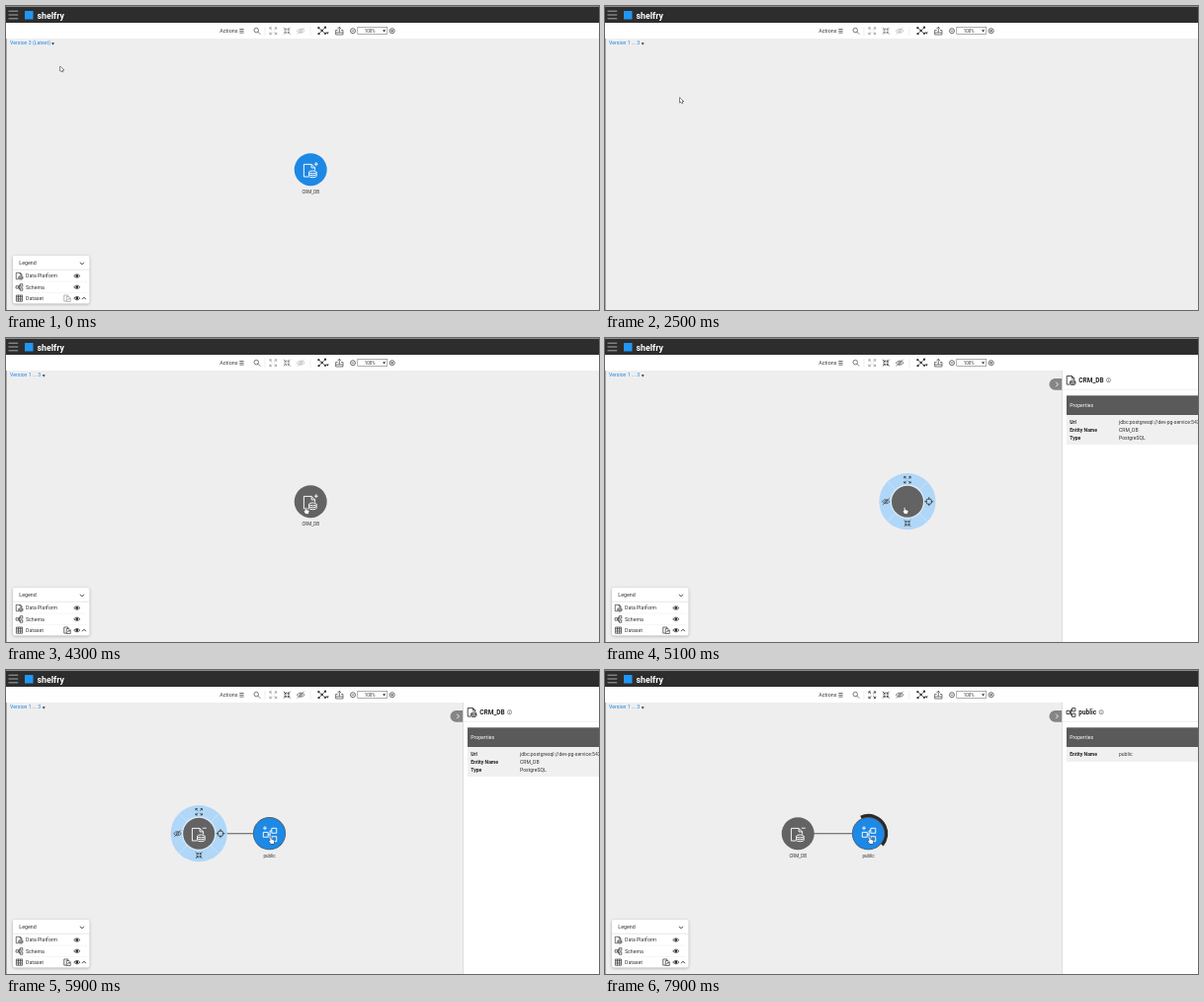
These frames come from a looping animation (600 by 308 pixels, 8000 ms). An HTML page with a canvas:

```html
<!DOCTYPE html>
<html lang="en">
<head>
<meta charset="utf-8">
<title>Data map</title>
<style>
html, body { margin: 0; width: 100%; height: 100%; overflow: hidden; background: #efeeef; }
canvas { display: block; width: 600px; height: 308px; }
</style>
</head>
<body>
<canvas id="stage"></canvas>
<script>
const W = 600, H = 308, LOOP = 8000;
const BLUE = '#1e88e5', INK = '#333', GREY = '#636363', PALE = '#b5b5b5';
const canvas = document.getElementById('stage');
const ctx = canvas.getContext('2d');
const ratio = window.devicePixelRatio || 1;
canvas.width = W * ratio;
canvas.height = H * ratio;

// Icons are drawn around 0,0 in a box of about ten units.
const ICONS = {
  doc: 'M-1 4.5H-4.5V-4.5H1L3.5-2V-.2M1-4.5V-2H3.5M-.8 1.2a2.7 1 0 1 0 5.4 0a2.7 1 0 1 0-5.4 0V4a2.7 1 0 0 0 5.4 0V1.2M-.8 2.6a2.7 1 0 0 0 5.4 0',
  schema: 'M-4.7-1.6H-1.3V1.8H-4.7ZM1.2-4.4H4.6V-1H1.2ZM1.2 1.4H4.6V4.8H1.2ZM-1.3 0H0V-2.7H1.2M0 0V3.1H1.2',
  table: 'M-4.3-4.3H4.3V4.3H-4.3ZM-4.3-1.9H4.3M-4.3 1.2H4.3M-1.4-4.3V4.3M1.6-4.3V4.3',
  compare: 'M-1 4H-4.5V-4.5H1V-2.5M-1-2.5H2.5L4.5-.5V4.5H-1ZM.2 2.8L3 0M1.3 0H3V1.7',
  eye: 'M-4.6 0Q0-5 4.6 0Q0 5-4.6 0Z',
  slash: 'M-4.6 0Q0-5 4.6 0Q0 5-4.6 0ZM-1.5 0a1.5 1.5 0 1 0 3 0a1.5 1.5 0 1 0-3 0M-4 4L4-4',
  expand: 'M-1.5-1.5L-4.5-4.5M-4.5-2V-4.5H-2M1.5-1.5L4.5-4.5M2-4.5H4.5V-2M-1.5 1.5L-4.5 4.5M-4.5 2V4.5H-2M1.5 1.5L4.5 4.5M2 4.5H4.5V2',
  collapse: 'M-4.5-4.5L-1.3-1.3M-3.8-1.3H-1.3V-3.8M4.5-4.5L1.3-1.3M3.8-1.3H1.3V-3.8M-4.5 4.5L-1.3 1.3M-3.8 1.3H-1.3V3.8M4.5 4.5L1.3 1.3M3.8 1.3H1.3V3.8',
  target: 'M-3.2 0a3.2 3.2 0 1 0 6.4 0a3.2 3.2 0 1 0-6.4 0M0-5V-2M0 2V5M-5 0H-2M2 0H5',
  search: 'M-4-1a3 3 0 1 0 6 0a3 3 0 1 0-6 0M1.2 1.2L4.4 4.4',
  net: 'M0 0L-3.5-3M0 0L3.5-3.4M0 0L-3.3 3.3M0 0L3.5 3',
  export: 'M-2-1H-4.5V4.5H4.5V-1H2M-4.5 2H4.5M0 2V-5M-2.2-2.8L0-5L2.2-2.8',
  minus: 'M-3.8 0a3.8 3.8 0 1 0 7.6 0a3.8 3.8 0 1 0-7.6 0M-2 0H2',
  plus: 'M-3.8 0a3.8 3.8 0 1 0 7.6 0a3.8 3.8 0 1 0-7.6 0M-2 0H2M0-2V2',
  info: 'M-3.8 0a3.8 3.8 0 1 0 7.6 0a3.8 3.8 0 1 0-7.6 0M0-.5V2.2M0-2.2V-1.4',
  down: 'M-3-1.5L0 1.5L3-1.5',
  up: 'M-3 1.5L0-1.5L3 1.5',
  right: 'M-1.5-3L1.5 0L-1.5 3'
};
for (const k in ICONS) ICONS[k] = new Path2D(ICONS[k]);
const ARROW = new Path2D('M0 0V5.2L1.2 4.1L2 5.9L2.8 5.5L2 3.8H3.7Z');
const HAND = new Path2D('M-.5 0Q.1-.6.7 0V2.3L3.3 2.9Q3.8 3.1 3.7 3.7L3.1 6.4H.2L-1.7 4Q-1.7 3-.5 3.6Z');

const clamp = v => Math.max(0, Math.min(1, v));
const mix = (a, b, p) => a + (b - a) * p;
const ease = p => p < .5 ? 4 * p ** 3 : 1 - (2 - 2 * p) ** 3 / 2;
const span = (t, a, b) => ease(clamp((t - a) / (b - a)));

function rect(x, y, w, h, color) {
  ctx.fillStyle = color;
  ctx.fillRect(x, y, w, h);
}

function disc(x, y, r, color) {
  ctx.fillStyle = color;
  ctx.beginPath();
  ctx.arc(x, y, r, 0, Math.PI * 2);
  ctx.fill();
}

function line(x1, y1, x2, y2, color, width) {
  ctx.strokeStyle = color;
  ctx.lineWidth = width;
  ctx.beginPath();
  ctx.moveTo(x1, y1);
  ctx.lineTo(x2, y2);
  ctx.stroke();
}

function text(s, x, y, size = 5.2, color = INK, weight = 400, align = 'left') {
  ctx.font = `${weight} ${size}px Roboto, Arial, sans-serif`;
  ctx.fillStyle = color;
  ctx.textAlign = align;
  ctx.textBaseline = 'alphabetic';
  ctx.fillText(s, x, y);
}

function icon(name, x, y, scale = .7, color = INK, width = .7) {
  ctx.save();
  ctx.translate(x, y);
  ctx.scale(scale, scale);
  ctx.strokeStyle = color;
  ctx.lineWidth = width / scale;
  ctx.stroke(ICONS[name]);
  ctx.restore();
}

function caret(x, y, color = INK) {
  ctx.fillStyle = color;
  ctx.beginPath();
  ctx.moveTo(x - 1.5, y - .9);
  ctx.lineTo(x + 1.5, y - .9);
  ctx.lineTo(x, y + 1.3);
  ctx.fill();
}

function eye(x, y) {
  icon('eye', x, y, .68, '#222', .7);
  disc(x, y, 1.3, '#222');
}

function card(x, y, w, h) {
  ctx.save();
  ctx.shadowColor = 'rgba(0,0,0,.3)';
  ctx.shadowBlur = 3 * ratio;
  ctx.shadowOffsetY = .7 * ratio;
  ctx.fillStyle = '#fff';
  ctx.beginPath();
  ctx.roundRect(x, y, w, h, 2);
  ctx.fill();
  ctx.restore();
}

function header() {
  rect(0, 0, W, 17, '#2d2d2d');
  rect(0, 0, W, .8, '#a0a0a0');
  for (const y of [5.2, 9, 12.8]) line(2.5, y, 12.2, y, '#c8c8c8', .8);
  rect(19, 5, 8.5, 8.5, '#2196f3');
  text('shelfry', 31.5, 12.8, 8.8, '#fff', 700);
}

function toolbar(t) {
  const focus = t >= 4600 ? INK : '#777';
  rect(0, 17, W, 16, '#fff');
  text('Actions', 216.3, 27, 5.35);
  for (const y of [23.5, 25.3, 27.1]) line(236.3, y, 240.6, y, INK, .7);
  icon('search', 254, 25.3, .75, '#444');
  line(262, 21, 262, 30, '#e3e3e3', .6);
  icon('expand', 270.3, 25.2, .75, t >= 6500 ? INK : '#999', .8);
  icon('collapse', 284.2, 25.2, .75, focus, .8);
  icon('slash', 298.2, 25.2, .85, t >= 4600 ? '#555' : PALE, .7);
  line(308, 21, 308, 30, '#e3e3e3', .6);
  icon('net', 319.7, 25, .95, INK, .7);
  for (const [x, y] of [[-3.5, -3], [3.5, -3.4], [-3.3, 3.3], [3.5, 3], [0, 0]])
    disc(319.7 + x * .95, 25 + y * .95, 1.15, INK);
  caret(325.3, 27.5);
  icon('export', 337.3, 25.3, .82, '#444');
  icon('minus', 351, 25.2, .66);
  ctx.strokeStyle = '#777';
  ctx.lineWidth = .6;
  ctx.strokeRect(355.8, 21.3, 30, 7.2);
  text('100%', 368.2, 26.8, 4.5, INK, 400, 'center');
  caret(382.6, 25.1);
  icon('plus', 390.7, 25.2, .66);
}

function versions(t) {
  const both = t >= 2400;
  text(both ? 'Version 1 ... 3' : 'Version 3 (Latest)', 4, 39.4, 5.2, BLUE);
  caret(both ? 38.2 : 47.5, 38.2);
  if (t < 1000 || both) return;
  card(4, 45, 78, 54);
  ctx.strokeStyle = '#aaa';
  ctx.lineWidth = .6;
  ctx.beginPath();
  ctx.roundRect(7.2, 48.2, 62, 7.6, 1.5);
  ctx.stroke();
  text('Search', 9.3, 53.5, 4.2, '#777');
  [3, 2, 1].forEach((n, i) => {
    const y = 66.4 + i * 13.3;
    text('Version ' + n, 9.3, y + 1.9, 5.2, BLUE);
    text('10/16/2023', 36, y + 1.9, 5.2, '#444');
    line(68.3, y - 3.5, 68.3, y + 3.5, '#ddd', .6);
    icon('compare', 75.2, y, .72, n === 3 || n === 1 && t >= 2100 ? INK : BLUE, .8);
    if (i < 2) line(6, y + 6.7, 80, y + 6.7, '#dfe8f0', .6);
  });
}

function legend(t) {
  card(7, 253, 77.5, 48.5);
  text('Legend', 13.3, 262, 5.3);
  icon('down', 77, 260.8, .65, '#222', .9);
  line(7, 267.2, 84.5, 267.2, '#ddd', .7);
  ['Data Platform', 'Schema', 'Dataset'].forEach((s, i) => {
    const y = 273.5 + i * 11.3;
    icon(['doc', 'schema', 'table'][i], 13.5, y, .72, INK, .7);
    text(s, 20, y + 1.9, 5.2);
    eye(71.8, y);
    if (i < 2) line(9, y + 5.6, 82, y + 5.6, '#ececec', .6);
  });
  icon('compare', 62, 296.2, .72, t >= 2400 ? INK : '#999', .7);
  icon('up', 79, 296.2, .65, '#222', .9);
}

function sign(x, y, minus) {
  line(x - 2, y, x + 2, y, '#fff', .9);
  if (!minus) line(x, y - 2, x, y + 2, '#fff', .9);
}

function ring(x, y) {
  disc(x, y, 28.6, '#b0d7f8');
  for (let a = Math.PI / 4; a < 6; a += Math.PI / 2)
    line(x, y, x + Math.cos(a) * 28.6, y + Math.sin(a) * 28.6, '#cfe6fa', .8);
  disc(x, y, 17.2, '#e0eefa');
  icon('expand', x, y - 22, .72, INK, .8);
  icon('collapse', x, y + 22, .72, INK, .8);
  icon('slash', x - 21.7, y, .85, '#444', .7);
  icon('target', x + 21.8, y, .9, INK, .8);
}

function graph(t) {
  const y = 165.7;
  const p = span(t, 5050, 5350);
  const x = mix(308.2, 195.2, p);
  const kidX = mix(308.2, 266.5, p);
  const open = t >= 4600 && t < 6500;

  if (p > .05) {
    ctx.globalAlpha = clamp(p * 1.5);
    line(x, y, kidX, y, '#555', 1.1);
    if (t >= 7000) {
      const a = (-115 + (t - 7900) * .36) * Math.PI / 180;
      ctx.strokeStyle = '#2b2b2b';
      ctx.lineWidth = 4;
      ctx.beginPath();
      ctx.arc(kidX, y, 17.8, a, a + 2.7);
      ctx.stroke();
    }
    disc(kidX, y, 16.6, '#555');
    disc(kidX, y, 16, BLUE);
    icon('schema', kidX + .6, y + 1, 1.45, '#fff', .95);
    sign(kidX - 4.5, y - 5.5, false);
    text('public', kidX, y + 23.8, 4.5, INK, 400, 'center');
    ctx.globalAlpha = 1;
  }

  if (open) ring(x, y);
  disc(x, y, open ? 16 : 16.5, t < 2400 ? BLUE : GREY);
  if (p === 0 || p === 1) {
    icon('doc', x - .5, y + 1, 1.4, '#fff', .95);
    sign(x + 5.6, y - 5.5, p === 1);
  }
  if (!open) text('CRM_DB', x, y + 23.8, 4.55, INK, 400, 'center');
}

function panel(t) {
  const p = span(t, 4550, 4850);
  if (!p) return;
  const kid = t >= 6500;
  const name = kid ? 'public' : 'CRM_DB';
  const rows = kid ? [['Entity Name', name]] : [
    ['Url', 'jdbc:postgresql://dev-pg-service:5432/'],
    ['Entity Name', name],
    ['Type', 'PostgreSQL']
  ];
  ctx.save();
  ctx.beginPath();
  ctx.rect(0, 33, W, H - 33);
  ctx.clip();
  ctx.translate((1 - p) * 150, 0);
  ctx.fillStyle = '#858585';
  ctx.beginPath();
  ctx.roundRect(449.5, 41, 13.5, 11.8, [5.9, 0, 0, 5.9]);
  ctx.fill();
  icon('right', 457.3, 46.9, .75, '#fff', .9);
  rect(462.5, 33, 137.5, 275, '#fff');
  line(462.5, 33, 462.5, H, '#d5d5d5', .7);
  icon(kid ? 'schema' : 'doc', 471.5, 42.8, .95, INK, .9);
  text(name, 479.3, 45.1, 6.5, '#222', 700);
  icon('info', kid ? 502.2 : 509.5, 42.7, .55, '#555', .6);
  line(463, 52.3, W, 52.3, '#e5e5e5', .6);
  rect(467, 58.3, 133, 19.7, '#5a5a5a');
  text('Properties', 470.2, 70.1, 5.2, '#fff');
  rect(467, 78, 133, kid ? 15 : 30, '#f0f0f0');
  rows.forEach(([k, v], i) => {
    text(k, 470.2, 87.2 + i * 8, 5.1, '#222', 700);
    text(v, 520, 87.2 + i * 8, 5.05, INK);
  });
  ctx.restore();
}

// Pointer stops: time, x, y
const STOPS = [
  [200, 55, 61], [800, 36, 37], [1100, 36, 37], [1600, 72.5, 85], [1900, 75, 92],
  [2300, 75, 92], [2700, 76.5, 93.5], [3700, 76.5, 93.5], [4200, 303, 171.8],
  [5400, 303, 171.8], [5850, 267.8, 169.5], [LOOP, 267.8, 169.5]
];

function pointer(t) {
  let [, x, y] = STOPS[0];
  for (let i = 1; i < STOPS.length; i++) {
    const [a, ax, ay] = STOPS[i - 1], [b, bx, by] = STOPS[i];
    if (t < a) break;
    const p = span(t, a, b);
    x = mix(ax, bx, p);
    y = mix(ay, by, p);
  }
  const arrow = t < 4150 || t > 5500 && t < 5680;
  const shape = arrow ? ARROW : HAND;
  ctx.save();
  ctx.translate(x, y);
  ctx.lineJoin = 'round';
  ctx.lineWidth = arrow ? 1 : .8;
  ctx.strokeStyle = '#222';
  ctx.stroke(shape);
  ctx.fillStyle = '#fff';
  ctx.fill(shape);
  ctx.restore();
}

function draw(t) {
  ctx.setTransform(ratio, 0, 0, ratio, 0, 0);
  rect(0, 0, W, H, '#efeeef');
  rect(0, 33, .8, H - 33, '#999');
  header();
  toolbar(t);
  if (t < 2500 || t >= 2900) {
    graph(t);
    legend(t);
  }
  versions(t);
  panel(t);
  pointer(t);
}

const start = performance.now();
function tick() {
  draw((performance.now() - start) % LOOP);
  requestAnimationFrame(tick);
}
tick();
</script>
</body>
</html>
```
